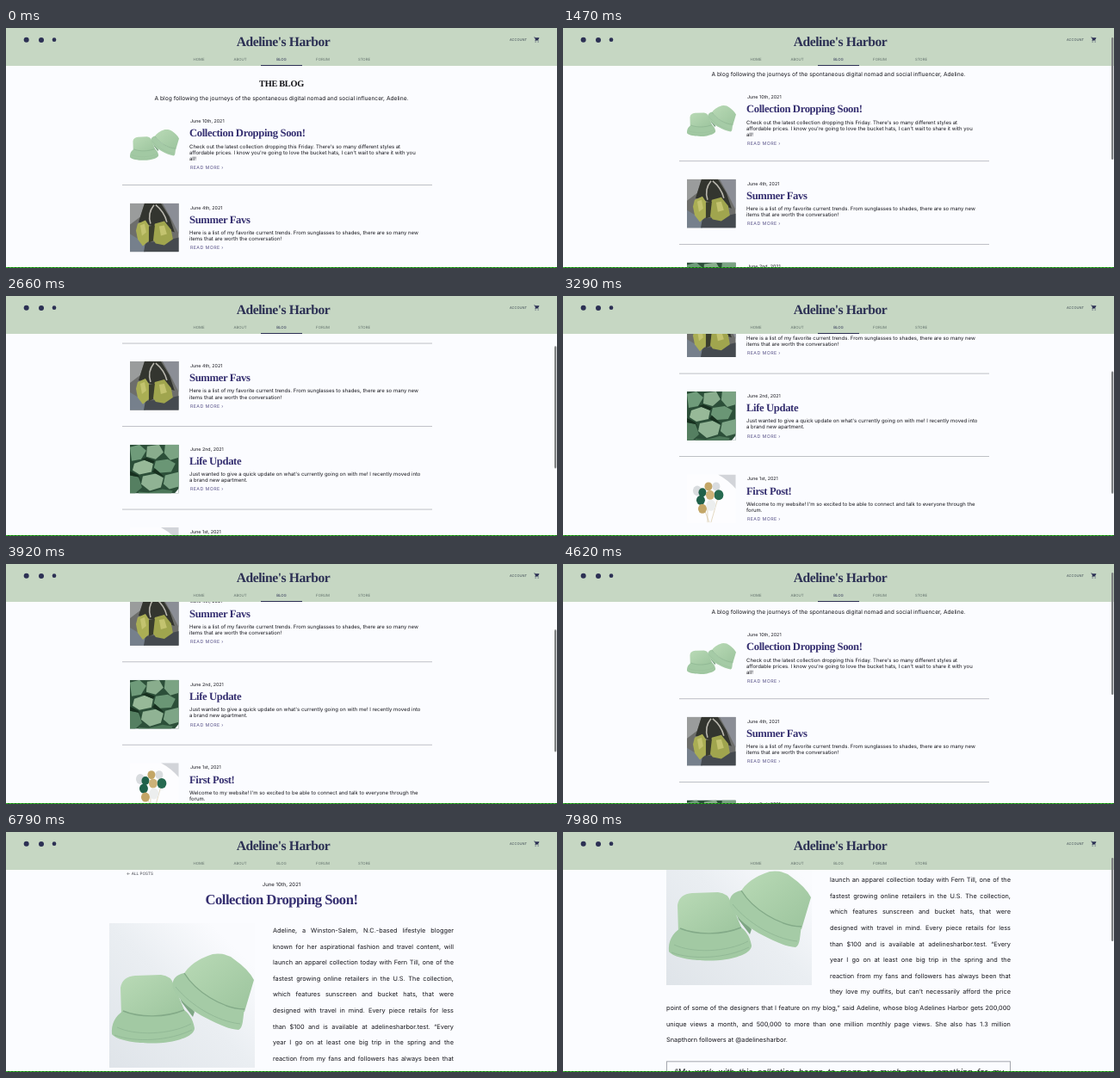
Animation, 640 px wide and 279 px high, one loop 8 s. Source, as an HTML page:

```html
<!DOCTYPE html>
<html lang="en">
<head>
<meta charset="utf-8">
<title>Blog</title>
<style>
@property --s { syntax: "<number>"; inherits: true; initial-value: 0; }

html, body { margin: 0; width: 100%; height: 100%; overflow: hidden; background: #fbfcff; }

/* Laid out at 1920 px wide; --x, --y, --w and --h count in thirds of that grid. */
#stage {
  position: absolute; width: 1920px; height: 837px; overflow: hidden;
  transform: scale(calc(1 / 3)); transform-origin: 0 0;
  background: #fbfcff; color: #16161c;
  font: 18px Inter, sans-serif; text-rendering: geometricPrecision;
  animation: scroll 8s infinite;
}
#stage * { box-sizing: border-box; }
.at { position: absolute; left: calc(var(--x) * 3px); top: calc(var(--y) * 3px); }
.box { width: calc(var(--w) * 3px); height: calc(var(--h) * 3px); }
/* --y is the middle of the capitals in the first line */
.t { line-height: 21.6px; margin-top: -10.8px; white-space: nowrap; }
.c { transform: translateX(-50%); }
.serif { font-family: "Liberation Serif", serif; font-weight: bold; letter-spacing: -.03em; color: #352f70; }
.row { display: flex; justify-content: space-between; }

.page { position: absolute; inset: 0; transform: translateY(calc(var(--s) * -3px)); }
.list { animation: list 8s step-end infinite; }
.article { animation: article 8s step-end infinite; }

header { position: absolute; left: 0; top: 0; width: 1920px; height: 132px; background: #c6d7c3; }
header .t { font-size: 13px; color: #62716c; }
header .title { font-size: 47px; color: #2c3054; }
header .account { font-size: 12px; color: #3c4853; }
header .current { animation: current 8s step-end infinite; }
.mark { background: #2c3054; border-radius: 50%; }
.underline { background: #2c3054; }

h1, h2, p { margin: 0; }
.date { font-size: 16px; }
.post h2 { font-size: 38px; }
.more { font-size: 16px; letter-spacing: 1.1px; color: #5a5489; }
.rule { background: #a0a2a9; }
.quote { border: 3px solid #a3a6ad; }
.quoted { font-style: italic; }

.thumb {
  left: 1911px; width: 7px; height: calc(var(--h) * 3px); border-radius: 4px; background: #7c7f80;
  top: calc(max(1, var(--k) * var(--s) - 2.3) * 3px); position: absolute;
}
.thumb.list { animation: list 8s step-end infinite, fade 8s linear infinite; }
.thumb.article { animation: article 8s step-end infinite, fade 8s linear infinite; }

.edge {
  position: absolute; left: 0; top: 278px; width: 640px; height: 1px;
  background: repeating-linear-gradient(90deg, #25ac1c 0 2px, #0d7409 2px 4px);
}

@keyframes scroll {
  0%, 11.375% { --s: 0; animation-timing-function: cubic-bezier(.5, 0, .8, .7); }
  18.375% { --s: 27.8; animation-timing-function: linear; }
  33.25% { --s: 127.5; animation-timing-function: cubic-bezier(.3, .4, .6, 1); }
  42% { --s: 190; animation-timing-function: cubic-bezier(.5, 0, .8, .6); }
  49% { --s: 165.7; animation-timing-function: linear; }
  57.75% { --s: 26; animation-timing-function: ease-out; }
  62.5%, 89.3% { --s: 0; animation-timing-function: cubic-bezier(.4, .1, .7, .9); }
  99.75%, 100% { --s: 96; }
}
@keyframes list { 0% { visibility: visible; } 72.625%, 100% { visibility: hidden; } }
@keyframes article { 0% { visibility: hidden; } 72.625%, 100% { visibility: visible; } }
@keyframes current { 0% { color: #2c3054; } 72.625%, 100% { color: #62716c; } }
@keyframes fade {
  0%, 11.3% { opacity: 0; }
  12.2%, 65% { opacity: 1; }
  69%, 90% { opacity: 0; }
  91%, 100% { opacity: 1; }
}
</style>
</head>
<body>
<svg width="0" height="0" style="position:absolute">
  <defs>
    <linearGradient id="felt" x2="1" y2="1"><stop stop-color="#b9dab6"/><stop offset="1" stop-color="#9cc49d"/></linearGradient>
    <linearGradient id="wall" x1="1" x2="0" y2="1"><stop offset=".15" stop-color="#fafbfe"/><stop offset=".5" stop-color="#eaeef2"/><stop offset="1" stop-color="#dfe4e9"/></linearGradient>
    <g id="hats">
      <path fill="url(#felt)" d="M134 213L133 181Q135 168 150 167L180 166Q192 167 195 178L208 209Q172 222 134 213Z"/>
      <path fill="#a2c9a3" d="M136 208C127 214 122 223 123 235C130 244 165 248 190 244C208 241 219 235 219 228C217 216 211 210 207 207C185 216 155 216 136 208Z"/>
      <path fill="none" stroke="#83aa88" stroke-width="1.4" d="M136 208C155 216 185 216 207 207"/>
      <path fill="none" stroke="#8fb593" stroke-width=".8" d="M126 236C150 245 190 243 216 230M129 227C150 237 190 236 215 223"/>
      <path fill="#7fa685" d="M196 178L204 198L217 215L219 209L208 196Z"/>
      <path fill="url(#felt)" d="M206 166Q215 150 240 142Q256 140 265 148Q282 160 288 172L277 209Q240 205 206 166Z"/>
      <path fill="#a5cba6" d="M207 164C196 166 192 173 194 182C199 194 215 207 230 215C245 223 258 229 270 230C276 228 275 215 277 206C250 205 220 185 207 164Z"/>
      <path fill="none" stroke="#83aa88" stroke-width="1.4" d="M207 164C220 185 250 205 277 206"/>
      <path fill="none" stroke="#8fb593" stroke-width=".8" d="M197 180C215 202 245 220 272 223"/>
    </g>
  </defs>
</svg>
<div id="stage"></div>
<div class="edge"></div>
<script>
const pos = (x, y) => `--x:${x};--y:${y}`;
const text = (x, y, cls, content, tag = 'p', css = '') =>
  `<${tag} class="at t ${cls}" style="${pos(x, y)};${css}">${content}</${tag}>`;
const box = (x, y, w, h, cls) => `<div class="at box ${cls}" style="${pos(x, y)};--w:${w};--h:${h}"></div>`;
const art = (x, y, w, h, view, shapes) =>
  `<svg class="at box" style="${pos(x, y)};--w:${w};--h:${h}" viewBox="${view}">${shapes}</svg>`;
const spread = (x, y, w, size, line, cls = '') =>
  text(x, y, 'row ' + cls, line.split(' ').map(word => `<span>${word}</span>`).join(' '), 'p', `width:${w * 3}px;font-size:${size}px`);
const path = (fill, d) => `<path fill="${fill}" d="${d}"/>`;
const dot = (fill, x, y, rx, ry = rx) => `<ellipse fill="${fill}" cx="${x}" cy="${y}" rx="${rx}" ry="${ry}"/>`;

const outfit = path('#6d6e6b', 'M0 0H57V57H0Z')
  + path('#9a9c9c', 'M0 0H17L12 16L0 25Z') + path('#8b8e96', 'M38 0H57V36L49 20Z')
  + path('#33352f', 'M17 0H36L46 16L52 34L40 30L24 26L10 22Z')
  + path('#76808c', 'M0 36L10 42L22 50L18 57H0Z') + path('#454a4f', 'M18 46L40 44L57 40V57H16Z')
  + path('#aaae54', 'M9 24L18 20L24 29L22 44L15 50L9 42L7 32Z')
  + path('#a0a54e', 'M29 24L40 21L48 31L50 42L40 49L30 47L25 40Z')
  + path('#c3c36f', 'M12 26L17 24L19 34L14 38ZM34 27L40 26L43 36L36 38Z')
  + path('#3a3d2d', 'M22 27L29 26L27 44L22 46Z')
  + '<path fill="none" stroke="#b9b7ae" stroke-width="1.6" d="M28 2Q20 12 24 24M30 2Q40 10 43 22"/>';

const leaves = path('#2c4f39', 'M0 0H57V57H0Z')
  + path('#6f9b7a', 'M0 3L11 0L19 7L13 17L2 19Z') + path('#89ad8d', 'M20 2L34 0L39 9L30 17L19 14Z')
  + path('#7ba383', 'M41 0H57V15L47 18L40 10Z') + path('#97b998', 'M5 22L17 18L27 22L25 32L11 35L3 30Z')
  + path('#6a9675', 'M30 19L44 17L53 22L48 32L35 33L28 27Z') + path('#557f61', 'M0 36L10 38L14 50L6 57H0Z')
  + path('#90b394', 'M15 37L30 34L39 39L36 50L23 54L13 46Z') + path('#7da586', 'M41 36L57 32V49L46 52L39 46Z')
  + path('#4c7759', 'M10 55L22 56L38 52L50 54L48 57H10Z')
  + path('#17301f', 'M13 17L19 15L29 19L27 22L17 18ZM26 32L29 28L36 34L40 38L30 34ZM0 31L10 36L14 46L10 38L0 36Z')
  + path('#fbfcff', 'M57 51V57H52Z');

const balloons = path('#fdfdff', 'M0 0H57V57H0Z') + path('#d2d4d9', 'M36 0H57V17Q49 7 36 0Z')
  + '<path fill="none" stroke="#c9b584" stroke-width=".5" d="M16 30L26 56M36 28L28 56M24 36V56"/>'
  + dot('#d9dcdf', 12, 19, 5, 6) + dot('#d9dcdf', 34, 14, 4.5, 5) + dot('#c3a667', 25, 14, 4.5, 5)
  + dot('#20614a', 18, 21, 4.5, 5) + dot('#276b51', 37, 24, 5.5, 6) + dot('#cdb278', 27, 24, 5, 5.5)
  + dot('#20614a', 16, 30, 5, 5.5) + dot('#eceeee', 28, 36, 5.5, 6.5) + dot('#c3a667', 18, 40, 5, 5.5);

const posts = [
  ['June 10th, 2021', 'Collection Dropping Soon!', [
    "Check out the latest collection dropping this Friday. There's so many different styles at",
    "affordable prices. I know you're going to love the bucket hats, I can't wait to share it with you", 'all!']],
  ['June 4th, 2021', 'Summer Favs', [
    'Here is a list of my favorite current trends. From sunglasses to shades, there are so many new',
    'items that are worth the conversation!'], outfit],
  ['June 2nd, 2021', 'Life Update', [
    "Just wanted to give a quick update on what's currently going on with me! I recently moved into",
    'a brand new apartment.'], leaves],
  ['June 1st, 2021', 'First Post!', [
    "Welcome to my website! I'm so excited to be able to connect and talk to everyone through the",
    'forum.'], balloons],
];

// The first post is taller by its third line.
const post = ([date, title, lines, picture], i) => {
  const y = i ? 86 + 96.5 * i : 82;
  return '<div class="post">'
    + (i ? box(135, y - .1, 360, .67, 'rule') : '')
    + (picture ? art(144, y + 21.2, 56.8, 56.8, '0 0 57 57', picture)
               : art(144, 118, 57, 36, '123 142 165 104', '<use href="#hats"/>'))
    + text(214, y + 26.5, 'date', date)
    + text(213, y + 40.6, 'serif', title, 'h2')
    + text(213, y + 55.8, '', lines.join('<br>'))
    + text(214, y + 58.8 + 7.2 * lines.length, 'more', 'READ MORE ›')
    + '</div>';
};

const story = [
  'Adeline, a Winston-Salem, N.C.-based lifestyle blogger',
  'known for her aspirational fashion and travel content, will',
  'launch an apparel collection today with Fern Till, one of the',
  'fastest growing online retailers in the U.S. The collection,',
  'which features sunscreen and bucket hats, that were',
  'designed with travel in mind. Every piece retails for less',
  'than $100 and is available at adelinesharbor.test. “Every',
  'year I go on at least one big trip in the spring and the',
  'reaction from my fans and followers has always been that',
  'they love my outfits, but can’t necessarily afford the price',
  'point of some of the designers that I feature on my blog,” said Adeline, whose blog Adelines Harbor gets 200,000',
  'unique views a month, and 500,000 to more than one million monthly page views. She also has 1.3 million',
];
const besidePicture = 10;
const storyY = i => 115 + 18.6 * i;
const storyLine = (line, i) => i < besidePicture
  ? spread(310, storyY(i), 210, 22, line)
  : spread(120, storyY(i), 400, 22, line);

const listPage = text(320, 65, 'c serif', 'THE BLOG', 'h1', 'font-size:31px;color:#121216')
  + text(320, 82, 'c', 'A blog following the journeys of the spontaneous digital nomad and social influencer, Adeline.', 'p', 'font-size:20px')
  + posts.map(post).join('');

const articlePage = text(140, 49, '', '← ALL POSTS', 'p', 'font-size:14px;color:#3a3b44')
  + text(320, 61.5, 'c', 'June 10th, 2021')
  + text(320, 78.5, 'c serif', 'Collection Dropping Soon!', 'h1', 'font-size:50px')
  + art(120, 106, 169, 168, '120 106 169 168', '<rect x="120" y="106" width="169" height="168" fill="url(#wall)"/><use href="#hats"/>')
  + story.map(storyLine).join('')
  + text(120, storyY(story.length), '', 'Snapthorn followers at @adelinesharbor.', 'p', 'font-size:22px')
  + box(120, 362.3, 400, 90, 'quote')
  + spread(129, 375, 383, 28, '“My work with this collection began to mean so much more, something for my', 'quoted');

const nav = ['HOME', 'ABOUT', 'BLOG', 'FORUM', 'STORE'];
const cart = path('#2c3054', 'M1 2V4H3L6.6 11.6L5.2 14C4.5 15.4 5.5 17 7 17H19V15H7.4L8.5 13H16Q17 13 17.7 12L21.3 5.5Q21.6 4 20.4 4H5.2L4.3 2Z')
  + dot('#2c3054', 7, 20, 2) + dot('#2c3054', 17, 20, 2);
const header = '<header>'
  + box(20.5, 10.7, 6, 6, 'mark') + box(38, 10.9, 6, 6, 'mark') + box(53.8, 11.4, 4.6, 4.6, 'mark')
  + text(322, 16.2, 'c serif title', "Adeline's Harbor", 'h1')
  + nav.map((name, i) => text(224 + 48 * i, 36.8, name === 'BLOG' ? 'c current' : 'c', name)).join('')
  + box(296, 43, 48, 1, 'underline list')
  + text(585, 13.8, 'account', 'ACCOUNT')
  + art(613, 10, 7.2, 7.2, '0 0 24 24', cart)
  + '</header>';

document.getElementById('stage').innerHTML =
  `<main class="page list">${listPage}</main><main class="page article">${articlePage}</main>${header}`
  + '<div class="thumb list" style="--h:142;--k:.476"></div><div class="thumb article" style="--h:97;--k:.338"></div>';
</script>
</body>
</html>
```
